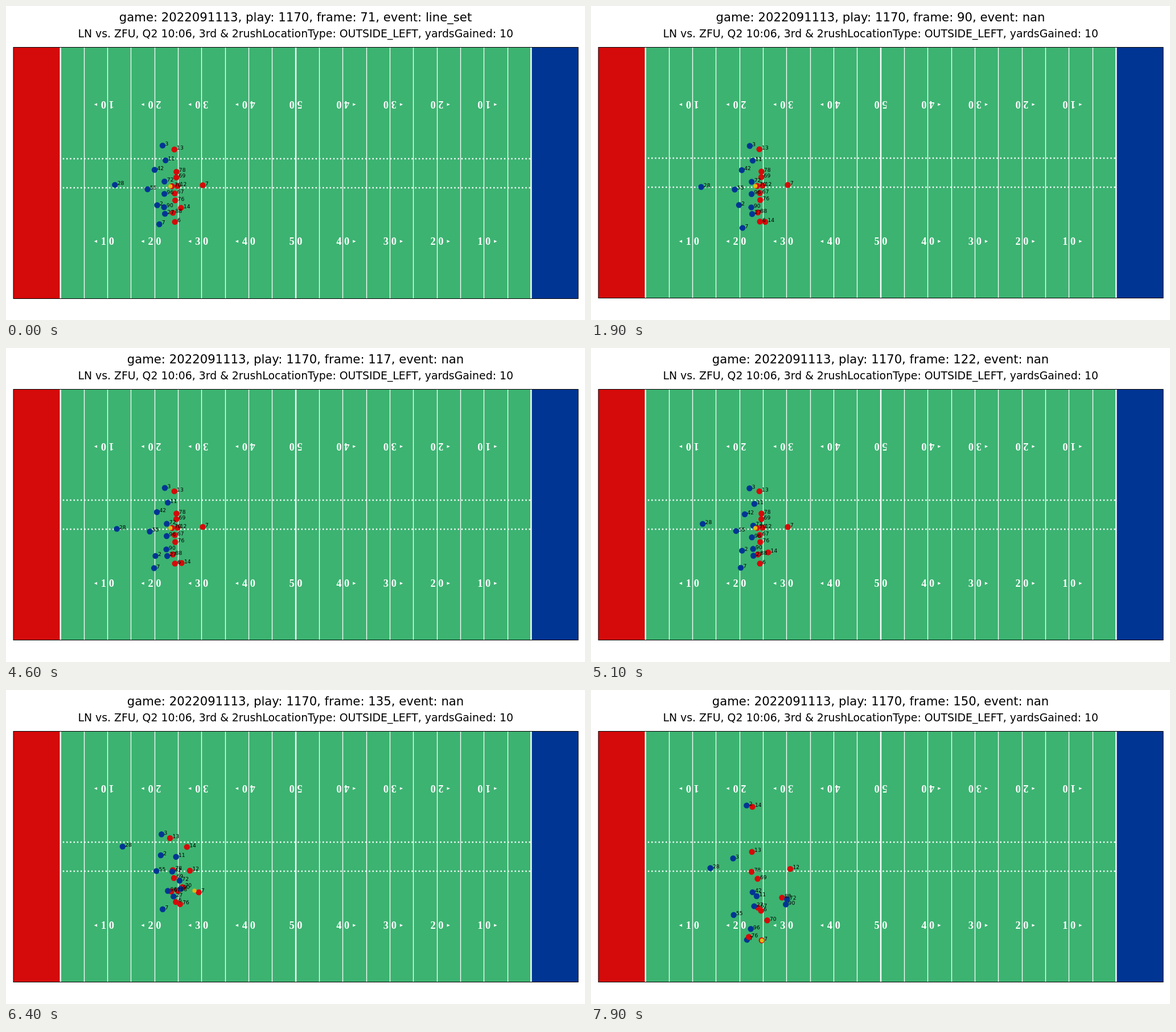
These frames come from a looping animation (1017x551 px, 8000 ms). An HTML page with a canvas:

```html
<!DOCTYPE html>
<html lang="en">
<head>
<meta charset="utf-8">
<title>Play tracking</title>
<style>
html, body { margin: 0; width: 100%; height: 100%; overflow: hidden; background: #fff; }
canvas { display: block; width: 1017px; height: 551px; }
</style>
</head>
<body>
<canvas id="stage" width="1017" height="551"></canvas>
<script>
const ctx = document.getElementById('stage').getContext('2d');
const RED = '#d50a0a', NAVY = '#003594', GREEN = '#3cb371', GOLD = '#e6b80f';
const LEFT = 13, TOP = 72.5, YARD = 8.267;
const SANS = '"DejaVu Sans", sans-serif';
const SERIF = '"Liberation Serif", serif';

// Phases of the play, in steps of 100 ms
const CREPT = 22, TURN = 34, SET = 46, HOLD = 52, SNAP = 54, CLASH = 64, END = 79;

// Monotone cubic through the given values
function curve(ts, vs) {
  const last = ts.length - 1;
  const slope = i => (vs[i + 1] - vs[i]) / (ts[i + 1] - ts[i]);
  const tangent = vs.map((_, i) => {
    if (i === 0) return slope(0);
    if (i === last) return slope(last - 1);
    const a = slope(i - 1), b = slope(i);
    return a * b <= 0 ? 0 : 2 * a * b / (a + b);
  });
  return s => {
    let i = 0;
    while (i < last - 1 && s > ts[i + 1]) i++;
    const h = ts[i + 1] - ts[i], u = (s - ts[i]) / h, w = 1 - u;
    return (1 + 2 * u) * w * w * vs[i] + u * w * w * h * tangent[i]
      + u * u * (3 - 2 * u) * vs[i + 1] - u * u * w * h * tangent[i + 1];
  };
}

function path(times, points) {
  const x = curve(times, points.map(p => p[0]));
  const y = curve(times, points.map(p => p[1]));
  return s => [x(s), y(s)];
}

// Stands still until the snap
const waits = (set, clash, end) => path([0, HOLD, CLASH, END], [set, set, clash, end]);

// Edges up to the line, then waits for the snap
const creeps = (set, clash, end) =>
  path([0, CREPT, SET, CLASH, END], [[set[0] - 4, set[1] - 1], set, set, clash, end]);

// Shifts about before the snap
const roams = (...points) => path([0, TURN, SET, CLASH, END], points);

const players = [];
const red = (number, at) => players.push({ color: RED, number, at });
const navy = (number, at) => players.push({ color: NAVY, number, at });

red(78, waits([299.4, 290.5], [293, 316], [282, 319]));
red(69, waits([299.2, 300.3], [295, 330], [292.6, 331.3]));
red(70, waits([291.6, 315.7], [310, 346], [309.5, 404.3]));
red(12, waits([301.3, 315.3], [323, 317], [350, 314]));
red(67, waits([296.4, 328.3], [290.5, 353.5], [293.3, 382]));
red(88, waits([293.2, 362.2], [302, 352.5], [335.5, 364.4]));
red(6, waits([296.7, 378.2], [298.3, 372], [298.6, 387.3]));
red(13, waits([295.7, 251.4], [288, 260], [282.7, 284]));
red(14, roams([307.4, 353.5], [305.4, 389.8], [308.5, 377.3], [317.8, 275.4], [283.5, 205]));

navy(3, creeps([279, 245.5], [273.2, 253.3], [249.6, 295.5]));
navy(11, creeps([284.2, 271.4], [298.6, 292.8], [291, 361.8]));
navy(42, creeps([265, 288], [292, 318.6], [283.8, 354.9]));
navy(72, creeps([282.4, 308.5], [304.9, 334.6], [344.4, 367.4]));
navy(55, creeps([252.6, 322], [264.2, 317.6], [250.6, 394.8]));
navy(96, creeps([282.2, 330], [284.3, 352.5], [280.7, 419.3]));
navy(90, creeps([281.7, 353.4], [306.8, 349], [342.2, 376.2]));
navy(27, creeps([283.2, 365], [294.3, 362.4], [286.6, 379.4]));
navy(28, roams([191.3, 313.3], [194.5, 319.3], [194.6, 317.4], [204.8, 274.8], [209.6, 312.5]));
navy(2, roams([265.6, 348.9], [257.5, 349.8], [262.5, 364.9], [271.9, 290], [273.4, 202.6]));
navy(7, roams([269.3, 382.3], [263.3, 392.5], [260.2, 386.2], [275.2, 384.8], [274, 438.4]));

red(76, waits([297.2, 340.5], [305.8, 375.7], [277.2, 433.3]));
red(7, waits([345.6, 314], [338.6, 355], [299.8, 439.2]));

const ball = waits([288.8, 315.9], [331, 352.2], [300.4, 439.4]);

function text(str, x, y, size, align) {
  ctx.font = size + 'px ' + SANS;
  ctx.textAlign = align;
  ctx.fillText(str, x, y);
}

function dot(x, y, r, color) {
  ctx.fillStyle = color;
  ctx.beginPath();
  ctx.arc(x, y, r, 0, Math.PI * 2);
  ctx.fill();
}

function line(x1, y1, x2, y2, width) {
  ctx.lineWidth = width;
  ctx.beginPath();
  ctx.moveTo(x1, y1);
  ctx.lineTo(x2, y2);
  ctx.stroke();
}

function yardNumber(label, x, y, flipped) {
  ctx.save();
  ctx.translate(x, y);
  if (flipped) ctx.rotate(Math.PI);
  ctx.font = 'bold 18.4px ' + SERIF;
  ctx.textAlign = 'center';
  ctx.fillText(label, 0, 6.2);
  ctx.restore();
}

function arrow(x, y, dir) {
  ctx.beginPath();
  ctx.moveTo(x + dir * 2.8, y);
  ctx.lineTo(x - dir * 2.5, y - 2.4);
  ctx.lineTo(x - dir * 2.5, y + 2.4);
  ctx.fill();
}

const yardX = n => LEFT + n * YARD;

function drawField(height) {
  const bottom = TOP + height, scale = height / 440;
  ctx.fillStyle = GREEN;
  ctx.fillRect(LEFT, TOP, YARD * 120, height);
  ctx.fillStyle = RED;
  ctx.fillRect(LEFT, TOP, YARD * 10, height);
  ctx.fillStyle = NAVY;
  ctx.fillRect(yardX(110), TOP, YARD * 10, height);

  ctx.strokeStyle = '#fff';
  for (let n = 10; n <= 110; n += 5) {
    const thick = n % 50 === 10;
    const x = thick ? yardX(n) : Math.floor(yardX(n)) + 0.5;
    line(x, TOP, x, bottom, thick ? 2.4 : 1.3);
  }
  ctx.setLineDash([2.36, 3.89]);
  for (const offset of [194.5, 245.5]) {
    const y = Math.ceil(TOP + offset * scale);
    line(yardX(10.5), y, yardX(110), y, 2.36);
  }
  ctx.setLineDash([]);

  ctx.fillStyle = '#fff';
  for (let n = 20; n <= 100; n += 10) {
    const label = (50 - Math.abs(60 - n)) / 10 + ' 0';
    for (const y of [172.8, 413]) {
      yardNumber(label, yardX(n), y, y < 200);
      if (n < 60) arrow(yardX(n) - 20.8, y, -1);
      if (n > 60) arrow(yardX(n) + 20, y, 1);
    }
  }
  ctx.strokeStyle = '#000';
  ctx.lineWidth = 1;
  ctx.strokeRect(LEFT, TOP, YARD * 120, height);
}

function draw(step) {
  const event = step === 0 ? 'line_set' : step === SNAP ? 'ball_snap' : 'nan';
  const height = event === 'nan' ? 440 : 441;
  const place = ([x, y]) => [x, TOP + (y - TOP) * height / 440];

  ctx.fillStyle = '#fff';
  ctx.fillRect(0, 0, 1017, 551);
  ctx.fillStyle = '#000';
  text(`game: 2022091113, play: 1170, frame: ${71 + step}, event: ${event}`, 508.5, 27.4, 21.2, 'center');
  text('LN vs. ZFU, Q2 10:06, 3rd & 2rushLocationType: OUTSIDE_LEFT, yardsGained: 10', 508.7, 55.3, 18.87, 'center');
  drawField(height);

  const spots = players.map(p => place(p.at(step)));
  players.forEach((p, i) => dot(...spots[i], 5.2, p.color));
  dot(...place(ball(step)), 3.6, GOLD);
  ctx.fillStyle = '#000';
  players.forEach((p, i) => text(p.number, spots[i][0] + 4.4, spots[i][1] + 0.4, 9.2, 'left'));
}

const start = performance.now();
function tick() {
  const t = (performance.now() - start) % 8000;
  draw(Math.floor(t / 100));
  requestAnimationFrame(tick);
}
tick();
</script>
</body>
</html>
```
